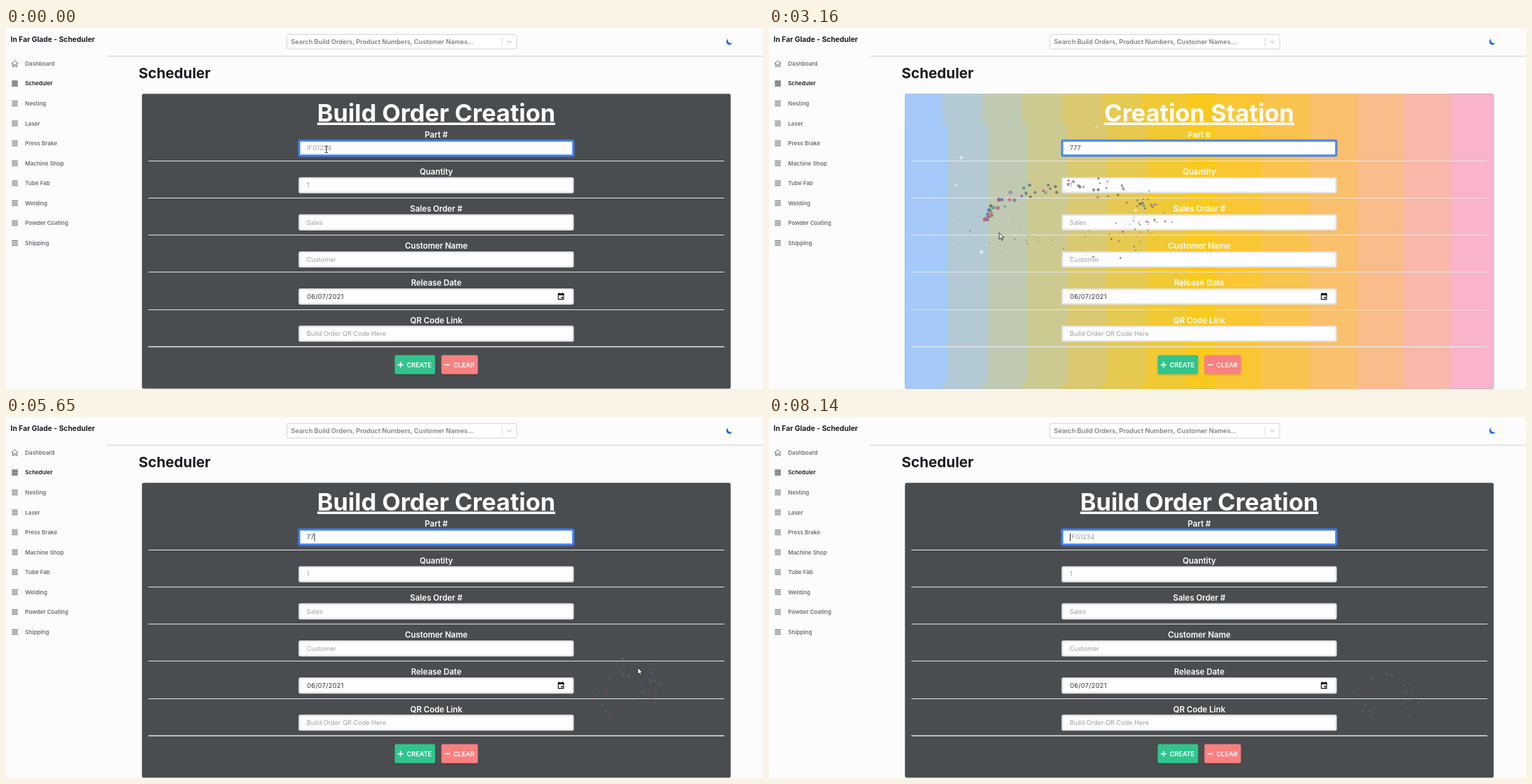
Animation of 1082 by 517 pixels, one loop 8.28 s. Source, as an HTML page with a canvas:

```html
<!DOCTYPE html>
<html lang="en">
<head>
<meta charset="utf-8">
<title>Scheduler</title>
<style>
  html, body { margin: 0; width: 100%; height: 100%; overflow: hidden; background: #fcfcfc; }
  svg, canvas { position: absolute; left: 0; top: 0; width: 1082px; height: 517px; }
  text { font-family: Inter, "Noto Sans", sans-serif; white-space: pre; }
  .nav { font-weight: 600; fill: #6c6f75; }
  .nav.on { fill: #1a1c23; }
  .brand, .page { font-weight: 700; fill: #1a1c23; }
  .search { font-weight: 600; fill: #808080; }
  .title { font-weight: 700; fill: #fff; text-anchor: middle; text-decoration: underline; }
  .label { font-weight: 600; fill: #fff; text-anchor: middle; }
  .hint { fill: #a0a0a0; }
  .value { fill: #4c4f52; }
  .date { fill: #333; letter-spacing: .3px; }
  .button { font-weight: 600; fill: #fff; }
</style>
</head>
<body>
<svg id="ui" viewBox="0 0 1082 517"></svg>
<canvas id="fx" width="1082" height="517"></canvas>
<script>
const LOOP = 8280;
const ui = document.getElementById('ui');
const ctx = document.getElementById('fx').getContext('2d');
const mix = (a, b, u) => a + (b - a) * u;

// ---------- page ----------
const ZOOM = .573;
const sizes = { nav: 14, brand: 18, page: 36, title: 60, label: 20 };
const rect = (x, y, w, h, fill, more = '') =>
  `<rect x="${x}" y="${y}" width="${w}" height="${h}" fill="${fill}" ${more}/>`;
const path = (d, stroke, width = 1, more = '') =>
  `<path d="${d}" fill="none" stroke="${stroke}" stroke-width="${width}" ${more}/>`;
// y is the middle of the capitals
const text = (cls, x, y, str, more = '') => {
  const size = (sizes[cls.split(' ')[0]] || 16) * ZOOM;
  return `<text class="${cls}" font-size="${size}" x="${x}" y="${y + size * .364}" ${more}>${str}</text>`;
};

function sidebar() {
  const items = ['Dashboard', 'Scheduler', 'Nesting', 'Laser', 'Press Brake', 'Machine Shop',
    'Tube Fab', 'Welding', 'Powder Coating', 'Shipping'];
  let out = text('brand', 6.6, 16.4, 'In Far Glade - Scheduler');
  items.forEach((name, i) => {
    const y = 51 + i * 28.55, on = i === 1, ink = on ? '#1a1c23' : '#6c6f75';
    out += text(on ? 'nav on' : 'nav', 27.3, y, name);
    if (i) {
      for (let k = 0; k < 4; k++) out += path(`M8.3 ${y - 3.4 + k * 2.25}h8.6`, ink, 1.1);
    } else {
      out += path(`M8.3 ${y}l4.3-4.3l4.3 4.3M9.4 ${y - 1}v5.3h2v-3h2.4v3h2v-5.3`, ink, 1,
        'stroke-linejoin="round" stroke-linecap="round"');
    }
  });
  return out;
}

function header() {
  return rect(144, 38.8, 938, 1, '#f1f1f2') + rect(144, 39.8, 938, 1.2, '#dedfe1') +
    rect(144, 41, 938, 1, '#f3f3f4') +
    rect(401.5, 9.3, 328.5, 20.8, '#fff', 'rx="2.2" stroke="#c8c8c8" stroke-width=".8"') +
    text('search', 407.2, 19.8, 'Search Build Orders, Product Numbers, Customer Names...') +
    path('M709 13.5v12.5', '#ccc', .7) +
    path('M716.4 18.2l3 3l3-3', '#c4c4c4', 1.1) +
    '<path fill="#1c64f2" transform="translate(1028.4 13.9) scale(.56)" ' +
    'd="M17.3 13.3A8 8 0 0 1 6.7 2.7a8 8 0 1 0 10.6 10.6z"/>' +
    text('page', 189.6, 64.8, 'Scheduler');
}

// Even bands from the yellow middle out to blue and pink, outermost painted first
function rainbow() {
  const yellow = [250, 201, 29];
  const shade = (end, d) => `rgb(${yellow.map((c, i) => Math.round(mix(c, end[i], d ** 1.15)))})`;
  const crisp = 'shape-rendering="crispEdges"';
  let out = rect(597, 94, 41, 423, shade(yellow, 0), crisp);
  for (let k = 7; k > 0; k--) {
    const x = 597 - 57 * k, fill = shade([165, 202, 249], k / 7);
    const left = k === 7 ? 194 : x, w = 597 - left;
    out += rect(left, 94, w, 423, fill, crisp) +
      rect(left - 7, 94, w, 44, fill, crisp) + rect(left - 7, 507, w, 10, fill, crisp);
  }
  for (let k = 6; k > 0; k--) {
    out += rect(638, 94, k === 6 ? 398 : 67.2 * k, 423, shade([249, 180, 202], k / 6), crisp);
  }
  return out;
}

function button(x, w, fill, icon, label, tx) {
  return rect(x, 471, w, 27, '#000', 'rx="2.5" opacity=".1" filter="url(#soft)"') +
    rect(x, 468.6, w, 27.2, fill, 'rx="2.3"') + path(icon, '#fff', 1.7) +
    text('button', tx, 482.3, label);
}

function card() {
  const fields = [['Part #', ''], ['Quantity', '1'], ['Sales Order #', 'Sales'],
    ['Customer Name', 'Customer'], ['Release Date', ''], ['QR Code Link', 'Build Order QR Code Here']];
  let out = '<defs><clipPath id="card"><rect x="194.3" y="94.2" width="841.5" height="422.2" rx="2.5"/></clipPath>' +
    '<filter id="soft" x="-20%" y="-50%" width="140%" height="200%"><feGaussianBlur stdDeviation="1.4"/></filter></defs>' +
    '<g clip-path="url(#card)">' + rect(194, 94, 842, 423, '#4a4d4f') + `<g id="fun">${rainbow()}</g></g>` +
    text('title', 615, 121, '', 'id="title"');
  fields.forEach(([name, hint], i) => {
    const y = 172 + i * 53.15;
    out += text('label', 615, y - 19.4, name);
    if (i) {
      out += rect(419.3, y - 10.4, 391.2, 20.9, '#fdfdfd', 'rx="1.6" stroke="#e2e4e8" stroke-width="2.2"');
    } else {
      out += rect(417.9, y - 11.8, 394, 23.7, 'none', 'rx="2.6" stroke="#3f83f8" stroke-opacity=".6" stroke-width="1.8"') +
        rect(419.4, y - 10.4, 391, 20.9, '#fdfdfd', 'rx="1.4" stroke="#3f83f8" stroke-width="2.3"');
    }
    out += text('hint', 429.8, y, hint);
    out += path(`M203.5 ${Math.floor(y + 18.4) + .5}H1026.7`, '#e3e5e8', i === 5 ? 1.4 : 1);
  });
  return out + text('hint', 429.8, 172, 'IFG1234', 'id="hint"') + text('value', 429.8, 172, '', 'id="value"') +
    rect(430, 166.3, .9, 11.6, '#222', 'id="caret"') +
    text('date', 430.2, 384.6, '06/07/2021') +
    path('M789.4 380.6h7.6v8h-7.6z', '#111', 1.1) + rect(789, 380.2, 8.4, 2.6, '#111') +
    path('M791 379v2M795.5 379v2', '#111', 1.1) + rect(793.6, 385, 2.2, 2.2, '#111') +
    button(555.6, 57.8, '#31c48d', 'M560 482.3h8M564 478.3v8', 'CREATE', 572.7) +
    button(622.3, 52.2, '#f98080', 'M626.8 482.3h8', 'CLEAR', 639.5);
}

ui.innerHTML = sidebar() + header() + card();
const [title, hint, value, caret, fun] =
  ['title', 'hint', 'value', 'caret', 'fun'].map(id => document.getElementById(id));

// ---------- timeline ----------
// time of a key press, sevens in the field, colourful card or not
const keys = [[-930, 0, false], [270, 1, false], [670, 2, false], [1100, 3, true],
  [5650, 2, false], [5770, 3, true], [6460, 1, true], [6580, 0, false]];
const BLINK = 530;

// The pointer circles around a drifting centre: time, centre, radii
const TURN = 716, LEAVE = 2060, SPIN = 2210, REST = SPIN + 4 * TURN;
const drift = [[LEAVE, 458, 224, 130, 50], [SPIN, 408, 250, 130, 50], [4000, 475, 295, 130, 32],
  [REST, 903, 399, 50, 40], [7400, 903, 399, 50, 40], [7760, 1046, 560, 50, 40]];

function pointer(t) {
  let i = 0;
  while (i < drift.length - 2 && t >= drift[i + 1][0]) i++;
  const a = drift[i], b = drift[i + 1];
  const u = Math.max(0, (t - a[0]) / (b[0] - a[0]));
  const [, cx, cy, rx, ry] = a.map((v, k) => mix(v, b[k], u));
  const turn = 2 * Math.PI * (Math.min(Math.max(t, SPIN), REST) - SPIN) / TURN;
  return [cx - rx * Math.sin(turn), cy - ry * Math.cos(turn)];
}

// ---------- effects ----------
let seed = 77;
const rnd = () => (seed = (seed * 16807) % 2147483647) / 2147483647;
const span = (a, b) => mix(a, b, rnd());
const inks = ['#7a4fa3', '#3a9d5d', '#c0507e', '#3f63b8', '#77706c', '#c56a45', '#4c525c', '#9a74b8', '#4fa58f'];
const ink = () => inks[Math.floor(rnd() * inks.length)];

const trail = [];
for (let t = LEAVE + 100; t < REST; t += 5) {
  const [x, y] = pointer(t);
  trail.push({ t, x: x + span(-6, 6), y: y + span(-6, 6), vx: span(-45, 45), vy: span(-25, 50),
    r: span(2.1, 3.3), life: span(500, 850), color: ink() });
}

const specks = [];
for (let i = 0; i < 52; i++) {
  const a = span(0, 2 * Math.PI), r = span(.5, 1);
  specks.push({ x: 884 + Math.cos(a) * 50 * r, y: 398 + Math.sin(a) * 39 * r, r: span(.4, 1.1), color: ink() });
}

const sparkles = [];
for (let i = 0; i < 105; i++) {
  sparkles.push({ x: span(200, 820), y: span(66, 409), size: span(2, 5.5), peak: span(1200, 6500), half: span(200, 320) });
}

function dot(x, y, r, color, alpha) {
  ctx.globalAlpha = alpha;
  ctx.fillStyle = color;
  ctx.beginPath();
  ctx.arc(x, y, r, 0, 7);
  ctx.fill();
}

function star({ x, y, size }, k) {
  const r = size * (.5 + .5 * k), c = r * .12;
  ctx.globalAlpha = .7 * k;
  ctx.fillStyle = '#fff';
  ctx.beginPath();
  ctx.moveTo(x, y - r);
  ctx.quadraticCurveTo(x + c, y - c, x + r, y);
  ctx.quadraticCurveTo(x + c, y + c, x, y + r);
  ctx.quadraticCurveTo(x - c, y + c, x - r, y);
  ctx.quadraticCurveTo(x - c, y - c, x, y - r);
  ctx.fill();
}

const arrow = new Path2D('M0 0V9.6L2.2 7.6L3.7 11L5.3 10.3L3.8 7H6.8Z');
const beam = new Path2D('M-2.2 -4.8Q-.3 -4.8 0 -4Q.3 -4.8 2.2 -4.8M0 -4V4M-2.2 4.8Q-.3 4.8 0 4Q.3 4.8 2.2 4.8');

function drawPointer(t) {
  const [x, y] = pointer(t);
  ctx.save();
  ctx.globalAlpha = 1;
  ctx.translate(x, y);
  ctx.strokeStyle = '#222';
  if (t < LEAVE) {
    ctx.stroke(beam);
  } else {
    ctx.fillStyle = '#fff';
    ctx.lineWidth = .9;
    ctx.fill(arrow);
    ctx.stroke(arrow);
  }
  ctx.restore();
}

function draw(t) {
  const [pressed, sevens, lively] = keys.filter(([at]) => at <= t).pop();
  fun.style.display = lively ? '' : 'none';
  title.textContent = lively ? 'Creation Station' : 'Build Order Creation';
  value.textContent = '7'.repeat(sevens);
  hint.style.display = sevens ? 'none' : '';
  caret.style.display = (t - pressed) % (2 * BLINK) < BLINK ? '' : 'none';
  caret.setAttribute('x', 430 + (sevens ? value.getComputedTextLength() : 0));

  ctx.clearRect(0, 0, 1082, 517);
  if (lively) {
    for (const s of sparkles) {
      const k = 1 - Math.abs(t - s.peak) / s.half;
      if (k > 0) star(s, k);
    }
  }
  for (const p of trail) {
    const age = t - p.t, u = age / p.life;
    if (age < 45 || u > 1) continue;
    dot(p.x + p.vx * age / 1000, p.y + p.vy * age / 1000, p.r * (1 - .75 * u), p.color, .75 - .2 * u);
  }
  if (t >= 5260) for (const s of specks) dot(s.x, s.y, s.r, s.color, .75);
  drawPointer(t);
}

const start = performance.now();
function tick() {
  draw((performance.now() - start) % LOOP);
  requestAnimationFrame(tick);
}
tick();
</script>
</body>
</html>
```
